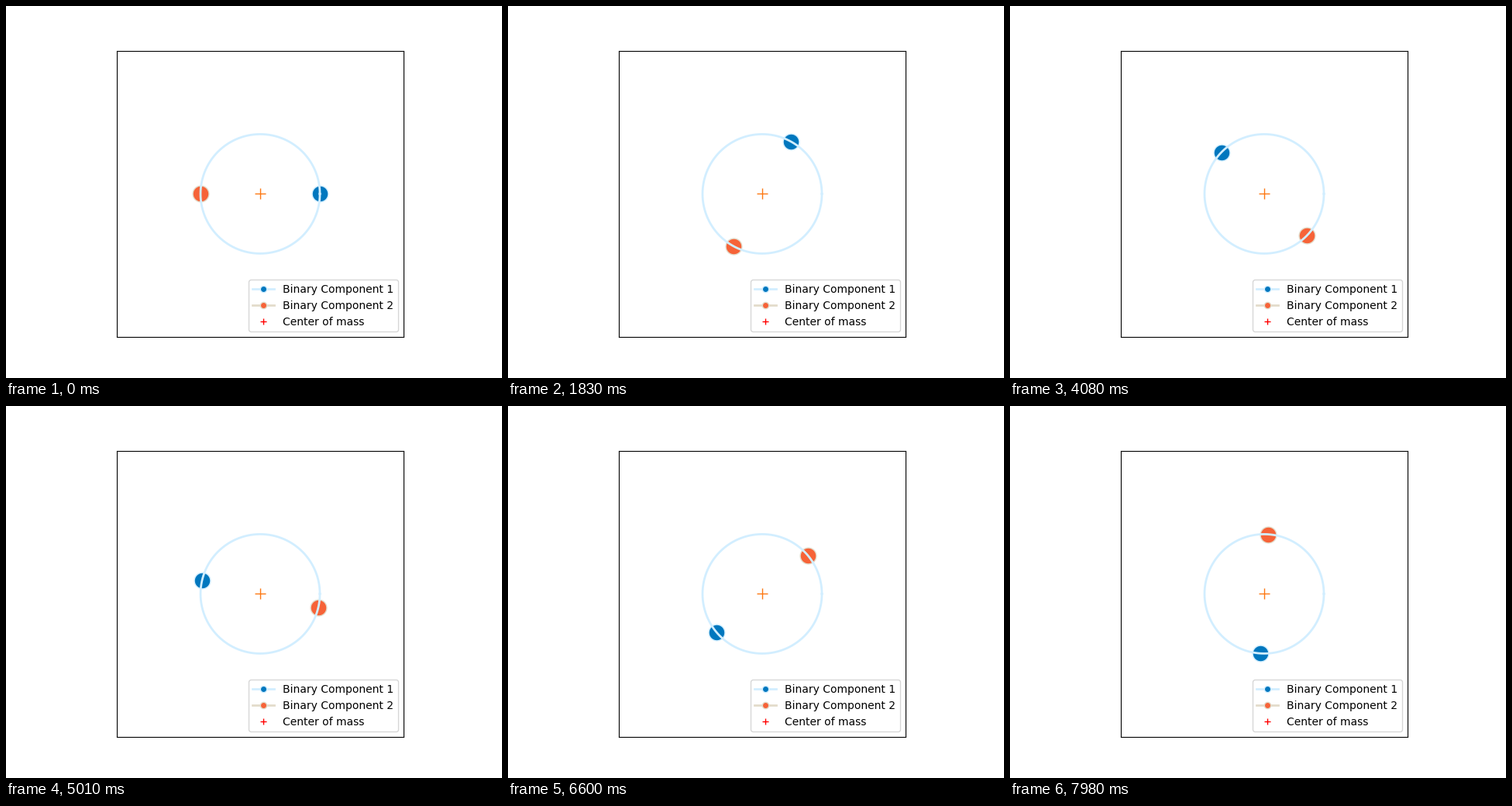
A matplotlib script for the animation above (8 s loop, 640 by 480 pixels).

```python
import numpy as np
import matplotlib.pyplot as plt
from matplotlib.animation import FuncAnimation

LOOP_MS = 8000
FRAMES = 267
STEP = np.radians(1)  # angle covered per frame
RADIUS = 0.5

PALE_BLUE, BLUE = "#d2eeff", "#0077be"
BEIGE, ORANGE = "#e3dccb", "#f66338"

plt.rcParams["font.family"] = "DejaVu Sans"
fig, ax = plt.subplots(figsize=(6.4, 4.8), dpi=100)
ax.set(xlim=(-1.2, 1.2), ylim=(-1.2, 1.2), xticks=[], yticks=[])
ax.set_aspect("equal")


def body(edge, face):
    return ax.plot([], [], "o", ms=15, mec=edge, mfc=face)[0]


def key(edge, face, label):
    ax.plot([], [], "o-", color=edge, mfc=face, lw=2, label=label)


first = body(PALE_BLUE, BLUE)
second = body(BEIGE, ORANGE)

theta = np.linspace(0, 2 * np.pi, 361)
ax.plot(RADIUS * np.cos(theta), RADIUS * np.sin(theta), color=PALE_BLUE, lw=2)
ax.plot(0, 0, "+", ms=10, mec="#fd7813")

key(PALE_BLUE, BLUE, "Binary Component 1")
key(BEIGE, ORANGE, "Binary Component 2")
ax.plot([], [], "r+", label="Center of mass")
ax.legend(loc="lower right")


def update(i):
    x, y = RADIUS * np.cos(i * STEP), RADIUS * np.sin(i * STEP)
    first.set_data([x], [y])
    second.set_data([-x], [-y])
    return first, second


ani = FuncAnimation(fig, update, frames=FRAMES, interval=LOOP_MS / FRAMES,
                    repeat=True, repeat_delay=0)
plt.show()
```
